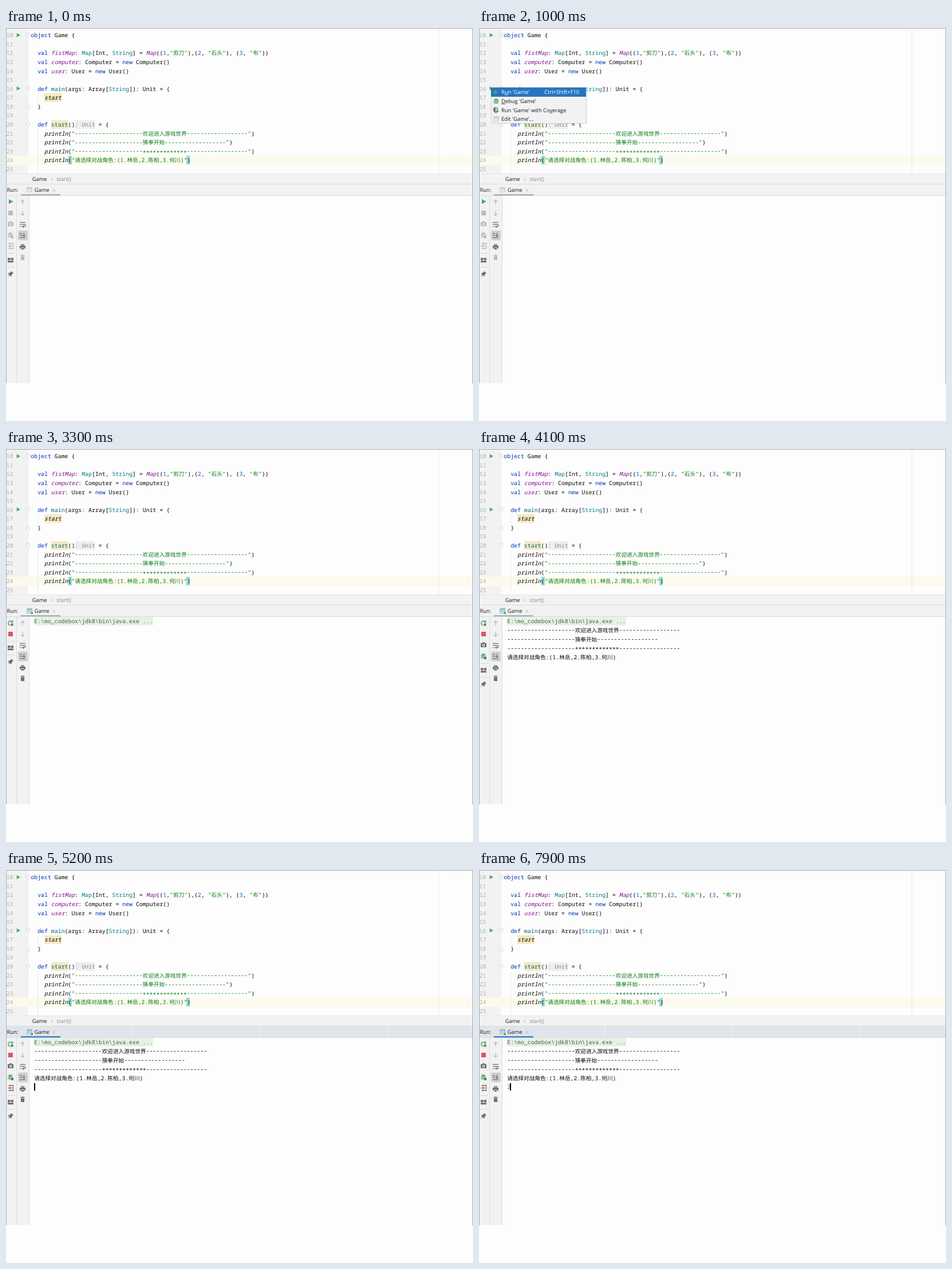
Recreate the animation shown at these times as an HTML page with a canvas. Size 816x686 px, loop 8 s.

```html
<!DOCTYPE html>
<html lang="zh-CN">
<head>
<meta charset="utf-8">
<title>Console game</title>
<style>
html, body { margin: 0; width: 100%; height: 100%; overflow: hidden; background: #fdfdfd; }
canvas { display: block; width: 816px; height: 686px; }
</style>
</head>
<body>
<canvas id="stage" width="816" height="686"></canvas>
<script>
const canvas = document.getElementById('stage');
const ctx = canvas.getContext('2d');
const LOOP = 8000;
const MONO = '9.88px "Noto Sans Mono", "DejaVu Sans Mono", monospace';
const HAN = '9.64px "Noto Sans CJK SC", "Noto Sans CJK", sans-serif';
const UI = '9.33px "Open Sans", "Noto Sans", sans-serif';
const PAPER = '#fdfdfd', PANEL = '#f2f2f2', LINE = '#dadcde', EDGE = '#a8a8a8';
const DARK = '#6e6e6e', PALE = '#bababa', GREEN = '#4fa565', RED = '#db5860';
const PITCH = 15.57;

const INK = {
  p: '#080808', i: '#080808', k: '#0033b3', f: '#871094',
  t: '#007e8a', d: '#00627a', n: '#1750eb', s: '#067d17', h: '#868686'
};
const ITALIC = 'if';

const WELCOME = '-'.repeat(20) + '欢迎进入游戏世界' + '-'.repeat(18);
const BEGIN = '-'.repeat(20) + '猜拳开始' + '-'.repeat(18);
const STARS = '-'.repeat(20) + '*'.repeat(13) + '-'.repeat(18);
const CHOOSE = '请选择对战角色:(1.林岳,2.陈柏,3.何川)';
const print = text => ['i', '    println', 'p', '(', 's', `"${text}"`, 'p', ')'];

// Each code line alternates style and text.
const CODE = [
  ['k', 'object ', 'p', 'Game {'],
  [],
  ['k', '  val ', 'f', 'fistMap', 'p', ': ', 't', 'Map', 'p', '[Int, ', 't', 'String', 'p', '] = ',
   'f', 'Map', 'p', '((', 'n', '1', 'p', ',', 's', '"剪刀"', 'p', '),(', 'n', '2', 'p', ', ',
   's', '"石头"', 'p', '), (', 'n', '3', 'p', ', ', 's', '"布"', 'p', '))'],
  ['k', '  val ', 'f', 'computer', 'p', ': Computer = ', 'k', 'new ', 'p', 'Computer()'],
  ['k', '  val ', 'f', 'user', 'p', ': User = ', 'k', 'new ', 'p', 'User()'],
  [],
  ['k', '  def ', 'd', 'main', 'p', '(args: Array[', 't', 'String', 'p', ']): Unit = {'],
  ['i', '    start'],
  ['p', '  }'],
  [],
  ['k', '  def ', 'd', 'start', 'p', '()', 'h', ': Unit', 'p', ' = {'],
  print(WELCOME),
  print(BEGIN),
  print(STARS),
  print(CHOOSE),
  []
];

const ICONS = {
  play: 'M-3.5-4.5L4.5 0L-3.5 4.5Z',
  stop: 'M-4-4h8v8h-8z',
  camera: 'M-5-3h2.2l1-1.6h3.6l1 1.6H5v7H-5zM2.4.6a2.4 2.4 0 1 0-4.8 0a2.4 2.4 0 1 0 4.8 0zM1.2.6a1.2 1.2 0 1 0-2.4 0a1.2 1.2 0 1 0 2.4 0z',
  bug: 'M-2.8-1.6a2.8 2.6 0 0 1 5.6 0v2.8a2.8 3 0 0 1-5.6 0zM-1.5-.8v1h3v-1zM-1.5 1.2v1h3v-1z',
  legs: 'M-3-5L-1.5-3.4M3-5L1.5-3.4M-5-1.4h2M5-1.4h-2M-5 1.2h2M5 1.2h-2M-4.4 4.4L-2.4 2.8M4.4 4.4L2.4 2.8',
  door: 'M-2.5-2.5v-2H4.5v9h-7v-2',
  enter: 'M-5 0H1.4M-.8-2.4L1.6 0L-.8 2.4',
  layout: 'M-5-4H-.5v4H-5zM.5-4H5v4H.5zM-5 1H5v3H-5z',
  pin: 'M1.2-5L5-1.2L3.8-.7L2 1.2L1.6 3.6L.4 4.2L-1.5 2.2L-4.6 5L-5 4.6L-2.2 1.5L-4.2-.4L-3.6-1.6L-1.2-2L.7-3.8Z',
  rerun: 'M3-2.4A3.8 3.8 0 1 0-.2 3.9',
  tip: 'M4.8-5V-.6H.4Z',
  up: 'M0 4V-3.6M-3.2-.6L0-3.8L3.2-.6',
  down: 'M0-4V3.6M-3.2.6L0 3.8L3.2.6',
  wrap: 'M-5-3.6H5M-5-.4H3a2 2 0 0 1 0 4H0M1.8 1.6L-.2 3.6L1.8 5.4M-5 3.6h2.6',
  end: 'M-5-3.4h4M-5-.2h4M-5 3.8H5M2.4-4.5V1.6M.2-.6L2.4 1.6L4.6-.6',
  printer: 'M-3-4.6h6v2h-6zM-5-2H5v5H3V1H-3v2h-2zM-2.2 1.8h4.4v3h-4.4z',
  trash: 'M-4-4h2.4v-1h3.2v1H4v1.4h-8zM-3.2-2h6.4v7h-6.4z',
  shield: 'M0-5L4-3.6V0Q4 3 0 5Q-4 3-4 0V-3.6ZM0-3.6V3.4Q2.6 2 2.6 0V-2.6Z',
  fold: 'M-3-3.5h6v4.2L0 3.5L-3 .7Z',
  foldEnd: 'M-3 3.5h6V-.7L0-3.5L-3-.7Z',
  cross: 'M-2.3-2.3L2.3 2.3M2.3-2.3L-2.3 2.3',
  chevron: 'M-1-2.2L1.2 0L-1 2.2'
};
for (const name in ICONS) ICONS[name] = new Path2D(ICONS[name]);

function box(x, y, w, h, color) {
  ctx.fillStyle = color;
  ctx.fillRect(x, y, w, h);
}

function paint(name, x, y, color, stroke = 0, scale = 1) {
  ctx.save();
  ctx.translate(x, y);
  ctx.scale(scale, scale);
  ctx.fillStyle = ctx.strokeStyle = color;
  ctx.lineWidth = stroke;
  if (stroke) ctx.stroke(ICONS[name]);
  else ctx.fill(ICONS[name], 'evenodd');
  ctx.restore();
}

// Draws mixed Latin and Han text and returns the x after it.
// Rules of dashes and stars are centred on the same height.
function mono(text, x, y, color, italic) {
  const lift = { '-': -0.5, '*': 1.8 };
  ctx.fillStyle = color;
  for (const run of text.match(/[\u4e00-\u9fff]+|\*+|-+|[^\u4e00-\u9fff*-]+/g)) {
    const han = run[0] >= '\u4e00';
    ctx.font = (italic ? 'italic ' : '') + (han ? HAN : MONO);
    ctx.fillText(run, x, y + (lift[run[0]] || 0));
    x += ctx.measureText(run).width;
  }
  return x;
}

function label(text, x, y, color = '#1a1a1a', mnemonic = -1) {
  ctx.font = UI;
  ctx.fillStyle = color;
  ctx.fillText(text, x, y);
  if (mnemonic < 0) return;
  const left = ctx.measureText(text.slice(0, mnemonic)).width;
  ctx.fillRect(x + left, y + 1, ctx.measureText(text[mnemonic]).width, 0.8);
}

function bug(x, y, color) {
  paint('bug', x, y, color);
  paint('legs', x, y, color, 1);
}

function windowIcon(x, y, live) {
  box(x - 4, y - 5, 9, 8, live ? '#b4c0c8' : '#d0d7db');
  box(x - 5, y - 3.5, 9, 8, live ? '#a3b1bb' : '#c3ccd2');
  box(x - 4.2, y - 1.6, 7.4, 5.3, live ? '#cfeaf3' : '#dcebf1');
  if (!live) return;
  box(x - 3.5, y, 5, 1, '#40a6c8');
  ctx.fillStyle = '#39c239';
  ctx.beginPath();
  ctx.arc(x + 4.2, y + 3.8, 2.1, 0, 7);
  ctx.fill();
}

function drawEditor(caret) {
  box(1, 1, 37.5, 253, PANEL);
  box(0, 223, 815, 16, '#fcfaed');
  box(756, 1, 1, 253, '#e8e8e8');
  box(38, 1, 1, 222, '#ececec');
  box(55, 114, 1, 16, '#ebebeb');
  box(55, 176, 1, 78, '#ebebeb');

  box(67, 114, 30, 15, '#f4e9c2');
  box(79, 161, 30, 15, '#f4e9c2');
  box(121, 161, 35, 15, '#eeeeee');
  box(109, 223, 6, 15, '#93d9d9');
  box(315, 223, 6, 15, '#93d9d9');

  CODE.forEach((line, row) => {
    const y = 16.3 + row * PITCH;
    mono(String(row + 10), 0.6, y, '#b0b0b0');
    let x = 43.3;
    for (let j = 0; j < line.length; j += 2) {
      x = mono(line[j + 1], x, y, INK[line[j]], ITALIC.includes(line[j]));
    }
  });

  for (const y of [12.5, 105.5]) paint('play', 21.5, y, GREEN, 0, 0.8);
  for (const [name, y] of [['fold', 13], ['fold', 106], ['foldEnd', 137.5], ['fold', 168.5]]) {
    paint(name, 38.5, y, PAPER);
    paint(name, 38.5, y, '#d2d2d2', 0.9);
    box(37, y - 0.5, 3, 0.8, '#d2d2d2');
  }
  if (caret) box(321, 225, 1, 12, '#000');
}

function drawHeaders(live, active) {
  box(1, 254, 814, 19, PANEL);
  box(1, 254, 814, 1, '#ebe5ea');
  label('Game', 45.7, 267.3);
  paint('chevron', 80, 264, '#aaa', 0.9);
  label('start()', 88.2, 267.3, '#8b8b8b');

  box(1, 273, 814, 19, active ? '#e1e5eb' : PANEL);
  box(1, 272, 814, 1, LINE);
  box(1, 292, 814, 1, LINE);
  if (active) for (const x of [220, 443, 666]) box(x, 273, 1, 19, '#f0f2f5');
  label('Run:', 1.6, 286.4);
  windowIcon(41, 282.5, live);
  label('Game', 49.8, 286.4);
  paint('cross', 84, 283.3, '#b6b6b6', 0.9);
  box(26, 290, 69, 2.5, active ? '#4083c9' : '#a4b4c0');
}

function drawTools(live, stage, waiting) {
  box(1, 293, 40, 327, PANEL);
  box(18, 293, 1, 327, LINE);
  box(40, 293, 1, 327, LINE);

  if (live) {
    paint('rerun', 7.5, 304, GREEN, 1.5);
    paint('tip', 7.5, 303.5, GREEN);
    box(8.5, 304.5, 4, 4, DARK);
  } else {
    paint('play', 8.3, 303, waiting ? PALE : GREEN, 0, 0.95);
  }
  paint('stop', 8, 323, live ? RED : PALE);

  // Extra actions push the layout and pin buttons down.
  if (stage > 0) {
    paint('camera', 8, 342, live ? DARK : PALE);
    bug(7.6, 361.5, live ? GREEN : PALE);
    box(9, 363, 4, 4, live ? DARK : PALE);
  }
  if (stage > 1) {
    paint('door', 8, 380.5, live ? DARK : PALE, 1.3);
    paint('enter', 8, 380.5, live ? RED : PALE, 1.3);
  }
  const shift = [0, 39, 58][stage];
  for (const y of [335, 359]) box(2, y + shift, 14, 1, '#d9d9d9');
  paint('layout', 8, 347.3 + shift, DARK);
  paint('pin', 8, 371.3 + shift, DARK);

  paint('up', 29, 304, PALE, 1.3);
  paint('down', 29, 323.3, PALE, 1.3);
  paint('wrap', 29, 343, DARK, 1.3);
  ctx.fillStyle = '#cfcfcf';
  ctx.beginPath();
  ctx.roundRect(21, 353.5, 17, 17, 2);
  ctx.fill();
  paint('end', 29, 362, DARK, 1.3);
  paint('printer', 29, 382, DARK);
  paint('trash', 29, 400.3, live ? DARK : PALE, 0, 0.95);
}

function drawConsole(printed, typed, caret) {
  const rowY = row => 304.4 + row * PITCH;
  box(49, 293, 208, 15, '#e6f2e4');
  mono('E:\\mo_codebox\\jdk8\\bin\\java.exe ...', 49.2, rowY(0), '#4a6046');
  if (printed) {
    [WELCOME, BEGIN, STARS, CHOOSE].forEach((text, i) => mono(text, 49.2, rowY(i + 1), '#080808'));
  }
  if (typed) mono('2', 49.2, rowY(5), '#21a021');
  if (caret) box(typed ? 54 : 49, 372, 2, 13, '#000');
}

function drawMenu(selected) {
  box(21, 103, 167, 64, '#d0d0d0');
  box(22, 104, 165, 62, PANEL);
  if (selected) box(21, 104, 166, 16, '#2675bf');
  const ink = selected ? '#fff' : '#1a1a1a';
  paint('play', 29.7, 112, GREEN, 0, 0.9);
  label("Run 'Game'", 39, 115.3, ink, 1);
  label('Ctrl+Shift+F10', 114, 115.3, selected ? '#fff' : '#8a8a8a');
  bug(30, 127.8, GREEN);
  label("Debug 'Game'", 39, 131, undefined, 0);
  paint('shield', 29, 143.2, DARK);
  paint('play', 32.5, 145.5, GREEN, 0, 0.6);
  label("Run 'Game' with Coverage", 39, 146.8, undefined, 18);
  windowIcon(30, 159, false);
  label("Edit 'Game'...", 39, 162.4);
}

// The state flips at each listed time, starting from off.
const toggled = (t, times) => times.filter(at => t >= at).length % 2 === 1;

function draw(t) {
  const live = t >= 3300;
  const stage = !live ? 2 : t < 3800 ? 0 : t < 4200 ? 1 : 2;
  box(0, 0, 816, 686, PAPER);
  drawEditor(toggled(t, [2300, 2800, 3700, 4100, 4600, 5100]));
  drawHeaders(live, t >= 5200);
  drawTools(live, stage, t >= 2400);
  if (live) drawConsole(t >= 3700, t >= 7900, toggled(t, [5200, 5600, 6100, 6500, 7000, 7500, 7900]));
  if (t >= 500 && t < 2200) drawMenu(t >= 1000);
  box(0, 0, 816, 1, EDGE);
  box(0, 0, 1, 620, EDGE);
  box(815, 0, 1, 621, EDGE);
}

ctx.textRendering = 'geometricPrecision';
const start = performance.now();
function tick() {
  draw((performance.now() - start) % LOOP);
  requestAnimationFrame(tick);
}
tick();
</script>
</body>
</html>
```
